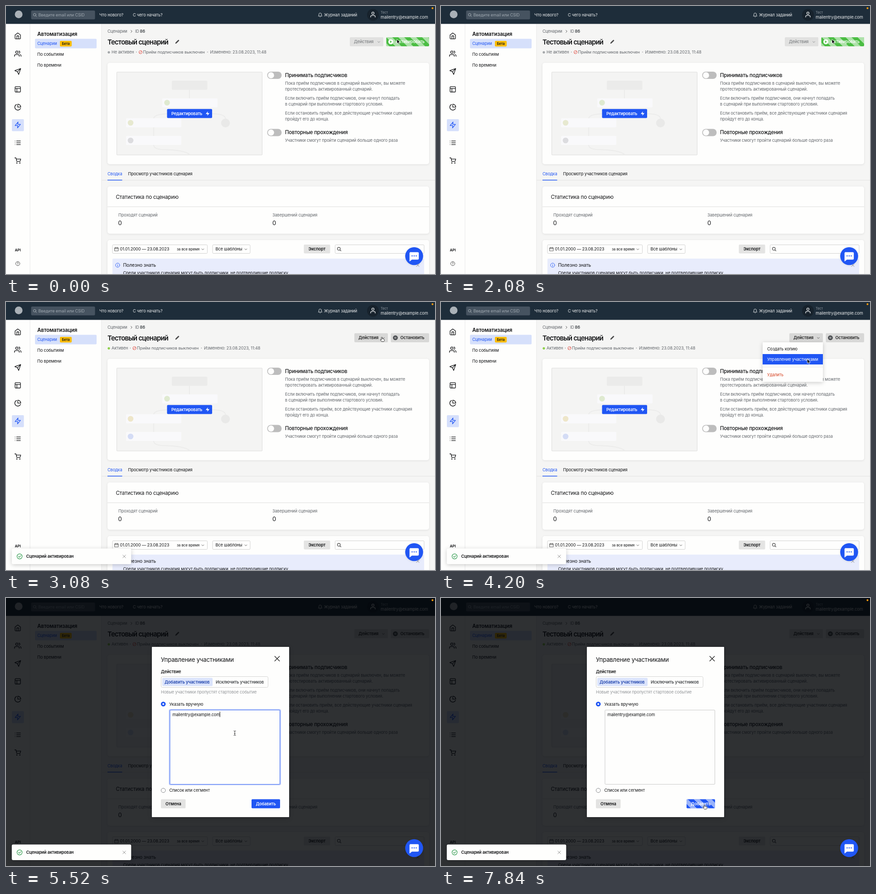
An HTML page that plays this animation: 947x592 px, repeating every 7880 ms.

```html
<!DOCTYPE html>
<html lang="ru">
<head>
<meta charset="utf-8">
<title>Автоматизация</title>
<style>
  html, body { margin: 0; width: 100%; height: 100%; overflow: hidden; background: #f5f5f4; }
  svg { display: block; width: 100vw; height: 100vh; }
  text { font-family: Inter, "Noto Sans", sans-serif; letter-spacing: -.013em; white-space: pre; }
  .title { letter-spacing: -.048em; }
  .card { filter: drop-shadow(0 1px 2px rgba(0,0,0,.09)); }
  .float { filter: drop-shadow(0 2px 5px rgba(0,0,0,.2)); }
</style>
</head>
<body>
<svg id="stage" viewBox="0 0 947 592"></svg>
<script>
const LOOP = 7880, STRIPE = 26.3, STRIPE_MS = 2000;
const BLUE = '#2056f4', WHITE = '#fefefd', INK = '#111214', GRAY = '#62666b';
const EMAIL = 'mailentry@example.com';

const ICONS = {
  home: 'M3 9l9-7 9 7v11a2 2 0 0 1-2 2H5a2 2 0 0 1-2-2z M9 22V12h6v10',
  users: 'M17 21v-2a4 4 0 0 0-4-4H5a4 4 0 0 0-4 4v2 M13 7a4 4 0 1 1-8 0 4 4 0 0 1 8 0 M23 21v-2a4 4 0 0 0-3-3.9 M16 3.1a4 4 0 0 1 0 7.8',
  send: 'M22 2L11 13 M22 2l-7 20-4-9-9-4z',
  layout: 'M5 3h14a2 2 0 0 1 2 2v14a2 2 0 0 1-2 2H5a2 2 0 0 1-2-2V5a2 2 0 0 1 2-2z M3 9h18 M9 21V9',
  pie: 'M21.2 15.9A10 10 0 1 1 8 2.8 M22 12A10 10 0 0 0 12 2v10z',
  zap: 'M13 2L3 14h9l-1 8 10-12h-9z',
  list: 'M8 6h13M8 12h13M8 18h13M3 6h.01M3 12h.01M3 18h.01',
  cart: 'M2 3h4l2.7 12h10.6L22 7H7 M10 20a1 1 0 1 1-2 0 1 1 0 0 1 2 0 M20 20a1 1 0 1 1-2 0 1 1 0 0 1 2 0',
  bell: 'M18 8A6 6 0 0 0 6 8c0 7-3 9-3 9h18s-3-2-3-9 M13.7 21a2 2 0 0 1-3.4 0',
  user: 'M20 21v-2a4 4 0 0 0-4-4H8a4 4 0 0 0-4 4v2 M16 7a4 4 0 1 1-8 0 4 4 0 0 1 8 0',
  search: 'M18 10a8 8 0 1 1-16 0 8 8 0 0 1 16 0 M22 22l-6-6',
  calendar: 'M3 5h18v16H3z M16 2v5 M8 2v5 M3 10h18',
  check: 'M22 12a10 10 0 1 1-20 0 10 10 0 0 1 20 0 M7.5 12l3.2 3.2 6-6',
  info: 'M22 12a10 10 0 1 1-20 0 10 10 0 0 1 20 0 M12 17v-6 M12 7.5v.1',
  help: 'M22 12a10 10 0 1 1-20 0 10 10 0 0 1 20 0 M9 9.5a3 3 0 1 1 4 2.8c-1 .5-1 1-1 1.7 M12 17.5v.1',
  ban: 'M22 12a10 10 0 1 1-20 0 10 10 0 0 1 20 0 M5 19L19 5',
  pencil: 'M17 3a2.8 2.8 0 1 1 4 4L7.5 20.5 2 22l1.5-5.5z',
  cross: 'M3 3l18 18M21 3L3 21',
  down: 'M4 8l8 8 8-8',
  right: 'M8 4l8 8-8 8'
};

const text = (x, y, str, fill = INK, size = 9.2, weight = 400, attrs = '') =>
  `<text x="${x}" y="${y + size * .36}" fill="${fill}" font-size="${size}" font-weight="${weight}" ${attrs}>${str}</text>`;
const rect = (x, y, w, h, fill, r = 0, attrs = '') =>
  `<rect x="${x}" y="${y}" width="${w}" height="${h}" rx="${r}" fill="${fill}" ${attrs}/>`;
const circle = (x, y, r, fill, attrs = '') => `<circle cx="${x}" cy="${y}" r="${r}" fill="${fill}" ${attrs}/>`;
const path = (d, stroke, width = 1, fill = 'none') =>
  `<path d="${d}" stroke="${stroke}" stroke-width="${width}" fill="${fill}" stroke-linecap="round" stroke-linejoin="round"/>`;
const icon = (name, x, y, size = 15.8, color = INK, width = 2, fill) =>
  `<g transform="translate(${x - size / 2} ${y - size / 2}) scale(${size / 24})">${path(ICONS[name], color, width, fill)}</g>`;
const group = (id, ...parts) => `<g id="${id}">${parts.join('')}</g>`;
const outline = color => `stroke="${color}"`;

const header = [
  rect(0, 0, 947, 39.5, '#1e2d3a'),
  circle(28, 18.5, 8.5, '#aab1b7'),
  rect(55.5, 10, 141, 19.5, '#465360', 2.5),
  icon('search', 64, 20, 8.5, '#b4bbc1', 2.5),
  text(71.5, 20, 'Введите email или CSID', '#9fa8b0', 9.1),
  text(206, 20, 'Что нового?', '#eceeef'),
  text(280, 20, 'С чего начать?', '#eceeef'),
  icon('bell', 693.5, 20, 11, '#eceeef'),
  text(702, 20, 'Журнал заданий', '#eceeef'),
  circle(810, 19.5, 13, '#17222c'),
  icon('user', 810, 19, 15, '#eceeef'),
  text(827, 14, 'Тест', '#8b959d', 7.5),
  text(827, 24.5, EMAIL, '#eceeef')
].join('');

const railIcons = ['home', 'users', 'send', 'layout', 'pie', 'zap', 'list', 'cart'];
const sidebar = [
  rect(0, 39.5, 211, 553, WHITE),
  path('M53 39.5V592M210.7 39.5V592', '#e4e4e3', .8),
  rect(13, 250, 26.5, 26.5, '#d5dffb', 2),
  ...railIcons.map((name, i) => icon(name, 26, 66 + i * 39.35, 15.8, name === 'zap' ? BLUE : INK)),
  text(26, 539, 'API', INK, 8.2, 600, 'text-anchor="middle"'),
  icon('help', 26, 569, 11, '#444', 2),
  text(69, 61.5, 'Автоматизация', INK, 11.6, 600),
  rect(64, 72.5, 136, 21, '#d6e0fb', 2),
  text(69, 83, 'Сценарии', BLUE),
  rect(119, 77, 26, 12.5, '#fbbd08', 2),
  text(132, 83.3, 'Бета', INK, 7.6, 600, 'text-anchor="middle"'),
  text(69, 106.5, 'По событиям'),
  text(69, 130.5, 'По времени')
].join('');

const preview = [
  rect(244.5, 146, 321, 183, '#f4f4f3', 1, outline('#dcdcdb')),
  path('M405 185V204 M362 238Q326 238 326 249V287 M455 238Q484 238 484.5 249 M326 307Q326 316 345 317Q395 318 405 328', '#ececeb', 2),
  rect(366, 165, 78.5, 20, '#ebebea', 2),
  ...[[345, 204], [265, 248], [265, 287]].map(([x, y]) => rect(x, y, 122, 20, '#f9f9fb', 2)),
  circle(355.5, 213.5, 6.3, '#dfead0'),
  circle(275, 258, 6.3, '#e7e9d0', 'id="dotA"'),
  circle(275, 297, 6.3, '#dcdcdf', 'id="dotB"'),
  circle(484.5, 258.5, 9.7, '#e9e9e8'),
  rect(355.5, 227.5, 99.5, 20, BLUE, 2),
  text(365, 237.5, 'Редактировать', '#fff', 9.2, 600),
  icon('zap', 445, 237.5, 10.5, '#fff', .5, '#fff')
].join('');

const toggle = y => rect(576.5, y - 8, 32, 16, '#bdbdbd', 8) + circle(585, y, 6.8, WHITE);
const card = (y, h) => rect(224, y, 710, h, WHITE, 5, 'class="card"');
const field = (x, w) => rect(x, 527.5, w, 19, WHITE, 2, outline('#d2d2d1'));

const content = [
  rect(211, 39.5, 736, 553, '#f5f5f4'),
  text(224, 56, 'Сценарии', GRAY), icon('right', 277, 56, 7.5, '#444', 3),
  text(285, 56, 'ID', GRAY), text(295.5, 56, '86', '#44484c', 9.2, 600),
  text(224, 79.5, 'Тестовый сценарий', INK, 14.8, 600, 'class="title"'),
  icon('pencil', 378, 79, 9.5, '#444', 1.5, '#444'),
  card(125.5, 224), preview,
  toggle(153), text(616, 152.5, 'Принимать подписчиков', INK, 11.4, 500),
  ...[[170.5, 'Пока приём подписчиков в сценарий выключен, вы можете'],
    [183.5, 'протестировать активированный сценарий.'],
    [203.5, 'Если включить приём подписчиков, они начнут попадать'],
    [216.5, 'в сценарий при выполнении стартового условия.'],
    [236.5, 'Если остановить приём, все действующие участники сценария'],
    [249.5, 'пройдут его до конца.'],
    [296.5, 'Участники смогут пройти сценарий больше одного раза']
  ].map(([y, line]) => text(616, y, line, GRAY)),
  toggle(279.5), text(616, 279, 'Повторные прохождения', INK, 11.3, 500),
  text(224, 370.5, 'Сводка', BLUE), text(269.5, 370.5, 'Просмотр участников сценария'),
  rect(211, 384.3, 736, 1, '#e2e2e1'), rect(224, 383.8, 32.5, 1.5, BLUE),
  card(398.5, 104.5), text(242.5, 421.5, 'Статистика по сценарию', INK, 11.55),
  rect(224, 443, 710, 1, '#dededd'),
  text(248, 462, 'Проходят сценарий', GRAY), text(588, 462, 'Завершений сценария', GRAY),
  text(247.5, 479, '0', INK, 13.1), text(588, 479, '0', INK, 13.1),
  card(517, 90), field(235, 209.5), field(456, 83), field(726.5, 196.5),
  icon('calendar', 244, 537, 10.5, '#444'),
  text(251.5, 537, '01.01.2000 — 23.08.2023'), text(377, 537, 'за все время', INK, 8),
  icon('down', 434.5, 537.5, 7, '#444', 3),
  text(462.5, 537, 'Все шаблоны'), icon('down', 529.5, 537.5, 7, '#444', 3),
  rect(657.5, 527, 58, 19.5, '#e4e4e3', 2), text(667.5, 537, 'Экспорт', INK, 9.2, 600),
  icon('search', 735.5, 537, 9.5, '#444', 3),
  rect(235, 558, 688, 40, '#e8ecfc', 2), icon('info', 246.5, 572.5, 11, BLUE),
  text(258.5, 572.5, 'Полезно знать', INK, 10.4),
  text(258.5, 590, 'Среди участников сценария могут быть подписчики, не подтвердившие подписку'),
  icon('cross', 909, 572.5, 8, '#555')
].join('');

const status = [
  text(288, 102, '·', GRAY, 9.2, 600, 'text-anchor="middle"'), icon('ban', 297, 102, 8.5, '#e0463c', 2.5),
  text(302.5, 102, 'Приём подписчиков выключен', GRAY, 9.15),
  text(445, 102, '·', GRAY, 9.2, 600, 'text-anchor="middle"'),
  text(450.5, 102, 'Изменено: 23.08.2023, 11:48', GRAY)
];

const idle = group('idle',
  circle(227, 102.3, 2.6, '#a4a7aa'), text(233, 102, 'Не активен', GRAY), ...status,
  rect(759, 69, 74, 20, '#e1e1e0', 2), text(768, 79, 'Действия', '#7d8083', 9.2, 500),
  icon('down', 823, 79.5, 7, '#7d8083', 3),
  rect(839.5, 69, 94.5, 20, '#4bbd43', 2), rect(839.5, 69, 94.5, 20, 'url(#stripes)', 2),
  circle(849.5, 79, 5.5, '#fff'), path('M848.2 76.800l3.3 2.200-3.3 2.200z', '#4bbd43', .5, '#4bbd43'),
  text(860.5, 79, 'Активировать', '#fff', 9.2, 600));

const active = group('active',
  circle(227, 102.3, 2.6, '#8fd04c'), text(233, 102, 'Активен', GRAY),
  `<g transform="translate(-13.5)">${status.join('')}</g>`,
  rect(769, 69, 74, 20, '#d8d8d7', 2), text(778, 79, 'Действия', '#222', 9.2, 600),
  icon('down', 833, 79.5, 7, '#444', 3),
  rect(849.5, 69, 84.5, 20, '#d8d8d7', 2), circle(859.5, 79, 5.3, '#4a4d50'),
  path('M858.3 77.2v3.6M860.7 77.2v3.6', '#ddd', 1.1),
  text(870.5, 79, 'Остановить', '#222', 9.2, 600));

const menu = group('menu',
  rect(710, 89, 133, 87.5, WHITE, 1, 'class="float"'),
  rect(710, 92.5, 133, 23, BLUE, 0, 'id="hover"'), rect(710, 143.5, 133, .8, '#e4e4e3'),
  text(720, 104, 'Создать копию', INK, 9.2, 400, 'id="copyItem"'),
  text(720, 127, 'Управление участниками', INK, 9.2, 400, 'id="manageItem"'),
  text(720, 161, 'Удалить', '#d6401f'));

const modal = group('modal',
  rect(0, 0, 947, 592, 'rgba(2,4,8,.82)'),
  rect(322, 108, 303, 376, WHITE, 1, 'class="float"'),
  text(342, 136, 'Управление участниками', INK, 13.15), icon('cross', 598.5, 134, 14, '#222', 2.2),
  text(342, 163, 'Действие', INK, 9.2, 600),
  rect(342.5, 173.5, 236, 24, WHITE, 3, outline('#d4d4d3')), rect(345, 176.5, 111, 18, '#dae3fb', 2),
  text(350, 185.5, 'Добавить участников', '#2145ad', 9.3, 600),
  text(463, 185.5, 'Исключить участников', '#45484b', 9.3, 600),
  text(342, 208, 'Новые участники пропустят стартовое событие', '#929598'),
  circle(347.2, 234.3, 5.3, BLUE), circle(347.2, 234.3, 2, '#fff'), text(360.5, 234.5, 'Указать вручную'),
  rect(361, 247, 244.5, 165, 'none', 2, 'id="ring" stroke="#b8c8fb" stroke-width="3"'),
  rect(362, 247.5, 242.5, 164, WHITE, 1.5, 'id="area"'),
  text(367.5, 257.5, EMAIL, INK, 9.2, 400, 'id="email"'),
  rect(368, 251, 1, 12, '#111', 0, 'id="caret"'),
  circle(347.2, 425, 4.8, WHITE, outline('#85888b')), text(360.5, 425, 'Список или сегмент'),
  rect(342, 444.5, 54.5, 20, '#e3e3e2', 2), text(352, 454.5, 'Отмена', INK, 9.2, 600),
  rect(542, 444.5, 63, 20, BLUE, 2), rect(542, 444.5, 63, 20, 'url(#stripes)', 2, 'id="busy"'),
  text(551.5, 454.5, 'Добавить', '#fff', 9.2, 600));

const toast = group('toast',
  rect(12.8, 544.6, 263.5, 34.4, WHITE, 3, 'class="float"'), icon('check', 30, 562, 13.5, '#2c9a4b'),
  text(44.5, 562, 'Сценарий активирован', INK, 9.2, 600), icon('cross', 261, 562, 8.5, '#777', 2.2));

const chat = circle(901, 552.5, 19.8, BLUE, 'class="card"') +
  path('M893 544h16q2 0 2 2v12q0 2-2 2h-13l-5 4v-18q0-2 2-2z', '#fff', .5, '#fff') +
  [896.5, 901, 905.5].map(x => circle(x, 552, 1.3, BLUE)).join('');

const cursors = group('cursor',
  group('arrow', path('M0 0V9.5L2.2 7.5 3.7 11 5.3 10.3 3.8 7H6.8z', '#fff', .8, '#000')),
  group('hand', path('M-.9 1Q0-.6.9 1V4.2Q2.4 3.4 2.7 4.7 4 4 4.3 5.2 5.6 4.8 5.6 6.3V8Q5.4 9.5 4.5 10.5H-.4L-3 7Q-3.6 5.5-2.2 5.7L-.9 6.8z', '#111', .8, '#fff')),
  group('beam', path('M-2-5Q0-5 0-4Q0-5 2-5M0-4V4M-2 5Q0 5 0 4Q0 5 2 5M-1 1H1', '#222', .9)));

document.getElementById('stage').innerHTML = `<defs>
  <pattern id="stripes" width="${STRIPE}" height="30" patternUnits="userSpaceOnUse">
    ${rect(0, 0, STRIPE / 2, 30, 'rgba(255,255,255,.55)')}</pattern></defs>` +
  content + sidebar + header + idle + active + menu + modal + toast + chat +
  circle(941.5, 4.8, 2.1, '#f59a0c') + cursors;

const el = id => document.getElementById(id);
const set = (id, attrs) => { for (const key in attrs) el(id).setAttribute(key, attrs[key]); };
const show = (id, visible) => set(id, { display: visible ? 'inline' : 'none' });
const clamp = v => Math.min(1, Math.max(0, v));
const smooth = v => v * v * (3 - 2 * v);

// Pointer moves: start, end, x, y.
const START = [863, 73.5];
const MOVES = [
  [2480, 3060, 829.5, 77],
  [3660, 3880, 808.5, 126],
  [4420, 4840, 505, 298.5],
  [5860, 6480, 581.5, 456]
];

function pointer(t) {
  let [x, y] = START;
  for (const [from, to, toX, toY] of MOVES) {
    const k = smooth(clamp((t - from) / (to - from)));
    x += (toX - x) * k;
    y += (toY - y) * k;
  }
  return [x, y];
}

function pointerKind(t, x, y) {
  if (t >= 4240) {
    if (x > 362 && x < 605 && y > 247 && y < 412) return 'beam';
    return x > 542 && x < 605 && y > 444 ? 'hand' : 'arrow';
  }
  return t > 2500 && x < 843 && y < 89 ? 'hand' : 'arrow';
}

// Stripes slide right from the corner of the button that is loading.
function moveStripes(x, y, elapsed) {
  const shift = elapsed / STRIPE_MS % 1 * STRIPE;
  set('stripes', { patternTransform: `translate(${x + shift} ${y}) skewX(45)` });
}

function draw(t) {
  const activated = t >= 2400, opened = t >= 4240, typed = t >= 5520, focused = t < 6600, busy = t >= 6640;
  const [x, y] = pointer(t), kind = pointerKind(t, x, y);

  show('idle', !activated);
  show('active', activated);
  set('dotA', { fill: activated ? '#eee6c9' : '#e7e9d0' });
  set('dotB', { fill: activated ? '#d4dcf5' : '#dcdcdf' });

  show('menu', t >= 3400 && !opened);
  const onCopy = y > 92 && y < 115, onManage = y >= 115;
  show('hover', onCopy || onManage);
  set('hover', { y: onManage ? 115 : 92.5 });
  set('copyItem', { fill: onCopy ? '#fff' : INK });
  set('manageItem', { fill: onManage ? '#fff' : INK });

  show('modal', opened);
  show('ring', focused);
  set('area', { stroke: focused ? '#4a74f3' : '#c9c9c8' });
  show('email', typed);
  show('caret', t < 4600 || (t >= 5080 && t < 6040));
  set('caret', { x: typed ? 367 + el('email').getComputedTextLength() : 368 });
  show('busy', busy);
  if (busy) moveStripes(542, 444.5, t - 6640);
  else moveStripes(839.5, 69, t);

  const rise = 1 - (1 - clamp((t - 2400) / 360)) ** 3;
  show('toast', activated);
  set('toast', { transform: `translate(0 ${(1 - rise) * 55})`, opacity: rise });

  set('cursor', { transform: `translate(${x} ${y})` });
  for (const name of ['arrow', 'hand', 'beam']) show(name, name === kind);
}

function tick() {
  draw(performance.now() % LOOP);
  requestAnimationFrame(tick);
}
tick();
</script>
</body>
</html>
```
